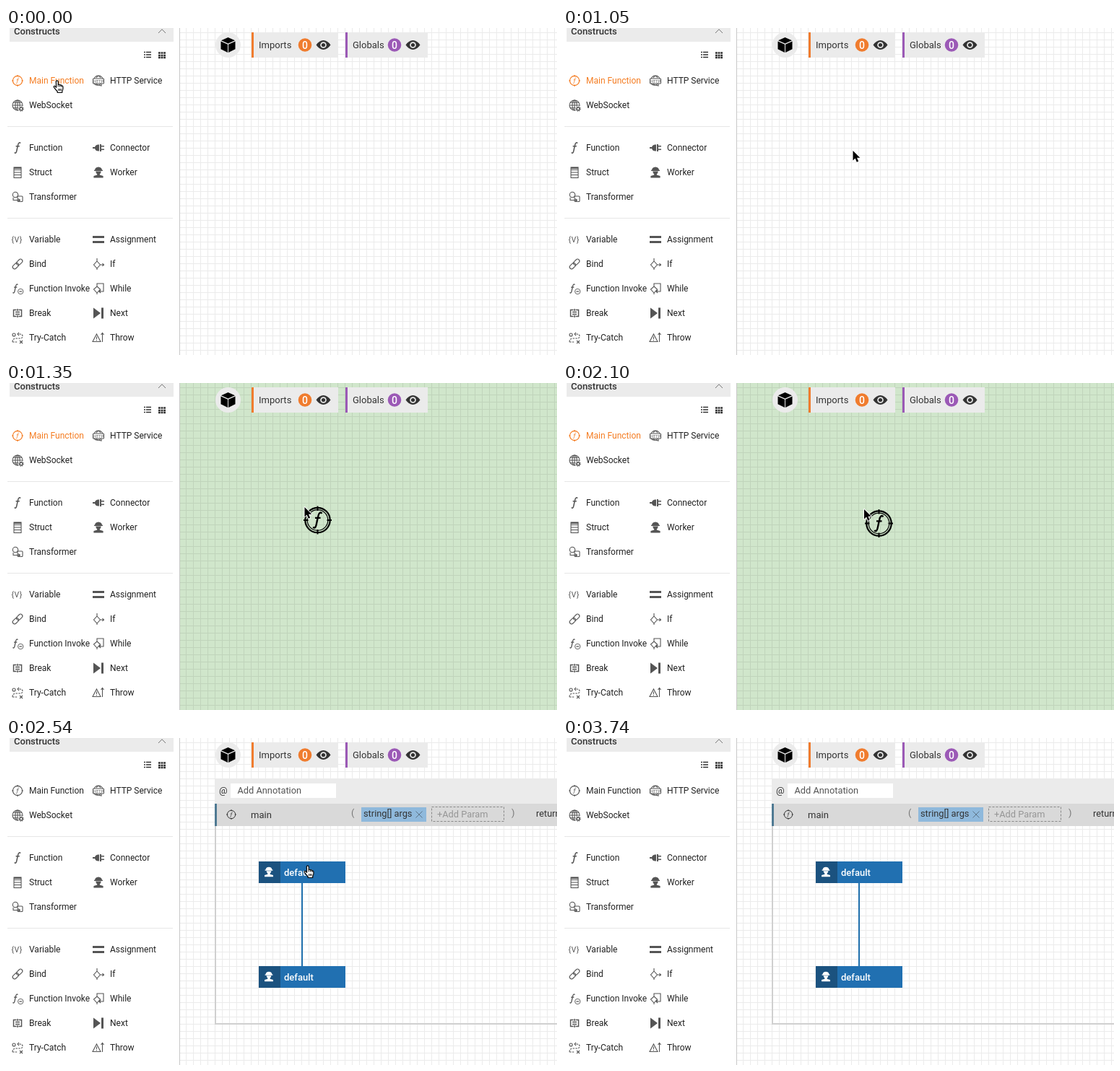
Write an HTML page that moves like this. It is 763 px wide and 453 px high and loops after 4.64 s.

```html
<!DOCTYPE html>
<html lang="en">
<head>
<meta charset="utf-8">
<title>Diagram editor</title>
<style>
  html, body { margin: 0; width: 100%; height: 100%; overflow: hidden; background: #fff; }
  svg { display: block; }
  text { font: 13px Roboto, sans-serif; fill: #333; white-space: pre; }
  .label text { font-size: 12px; fill: #222; }
  .icon { fill: none; stroke: #555; stroke-width: 1.1; color: #555; }
  .icon .solid { fill: currentColor; stroke: none; }
  .icon text { font-size: 6px; fill: currentColor; stroke: none; }
  .hot .icon { stroke: #f47b20; color: #f47b20; }
  .hot > text { fill: #f47b20; }
  .param text { font-size: 12.8px; }
</style>
</head>
<body>
<svg id="stage" width="763" height="453" viewBox="0 0 763 453">
  <defs>
    <pattern id="grid" x="249" y="6" width="10" height="10" patternUnits="userSpaceOnUse">
      <path d="M0 0H10V1H1V10H0Z" fill="#000" fill-opacity=".08"/>
    </pattern>
    <path id="f" d="M3.4-5.3C2.4-6.8 .9-5.8 .4-3L-1.1 3.9C-1.6 6.2-2.7 6.6-3.5 5.3M-2-1.8H2.3"/>
    <g id="target">
      <circle r="6.6"/>
      <path d="M0-8V-5.6M0 8V5.6M-8 0H-5.6M8 0H5.6"/>
      <use href="#f" transform="scale(.66)"/>
    </g>
    <g id="eye">
      <path d="M-10 0Q-5.5-6.5 0-6.5T10 0Q5.5 6.5 0 6.5T-10 0Z" fill="#333"/>
      <circle r="4.3" fill="#ebebeb"/><circle r="2.6" fill="#333"/>
    </g>
    <path id="person" d="M-5-3.2Q-4.6-7.2 0-7.5Q4.6-7.2 5-3.2H6V-2H-6V-3.2ZM-3.8-1.4H3.8Q3.4 1.4 1.8 2.5V3.6L6.6 5V7.5H-6.6V5L-1.8 3.6V2.5Q-3.4 1.4-3.8-1.4Z"/>
    <g id="arrow">
      <path d="M1.5 1V14.4L4.6 11.6 6.8 16.8 9.2 15.8 7 10.8H11.3Z" stroke="#fff" stroke-width="1.8" stroke-linejoin="round"/>
      <path d="M1.5 1V14.4L4.6 11.6 6.8 16.8 9.2 15.8 7 10.8H11.3Z"/>
    </g>
    <g id="hand">
      <path d="M4.3 2.3Q4.4.8 5.7.8T7.2 2.3V6.5Q8.8 5.6 9.6 7Q11.4 6.4 11.9 7.9Q13.8 7.6 13.9 9.5V12Q13.6 14.4 12.7 15.5V17.5H6.2V16Q4 13.6 1.2 9.8Q.9 8 2.6 8.4L4.6 10.3Z" fill="#fff" stroke="#000" stroke-width="1.2" stroke-linejoin="round"/>
      <path d="M7.2 6.5V9.5M9.6 7V9.7M11.9 7.9V10M7.7 12V15M9.5 12V15M11.3 12V15" stroke="#000" stroke-width=".9"/>
    </g>
  </defs>

  <rect id="paper" x="241" width="522" height="453"/>
  <rect x="241" width="522" height="453" fill="url(#grid)"/>

  <g id="diagram">
    <path d="M290 122V396H763" fill="none" stroke="#d0d0d0" stroke-width="2"/>
    <rect x="289" y="56" width="474" height="35" fill="#ebebeb"/>
    <rect x="311" y="63" width="146" height="20" fill="#fff"/>
    <text x="295" y="77">@</text>
    <rect x="289" y="91" width="474" height="31" fill="#d9d9d9"/>
    <rect x="289" y="91" width="3" height="31" fill="#4f7a93"/>
    <g class="icon" transform="translate(312 106) scale(.86)" style="stroke:#333"><use href="#target"/></g>
    <text x="339" y="111">main</text>
    <g class="param">
      <text x="320.500" y="77" style="fill:#555">Add Annotation</text>
      <text x="478" y="108" style="fill:#777">(</text>
      <rect x="492" y="96" width="90" height="20" fill="#8fb9dc"/>
      <text x="495" y="109">string[] args</text>
      <path d="M567.500 101.500L576.500 110.500M576.500 101.500L567.500 110.500" stroke="#5d7488"/>
      <rect x="589.500" y="95.500" width="100" height="20" fill="none" stroke="#888" stroke-dasharray="3 2"/>
      <text x="597" y="110" style="fill:#969696">+Add Param</text>
      <text x="700" y="108" style="fill:#777">)</text>
      <text x="734" y="109">returns</text>
    </g>
    <path d="M410 201V316" stroke="#1f6fac" stroke-width="2"/>
    <g id="boxes"></g>
  </g>

  <circle cx="307.500" cy="23.500" r="17.500" fill="#ebebeb"/>
  <path d="M307.500 13L317 17.200 307.500 21.500 298 17.200ZM297.500 18.500L307 22.700V34L297.500 29.300ZM317.500 18.500L308 22.700V34L317.500 29.300Z"/>
  <g id="tabs"></g>

  <rect width="240" height="453" fill="#fff"/>
  <path d="M240.500 0V453" stroke="#c8c8c8"/>
  <rect x="5" width="227" height="19" fill="#ebebeb"/>
  <text x="11" y="9" font-weight="500" style="font-weight:500">Constructs</text>
  <path d="M211 7L216 1.800 221 7" fill="none" stroke="#777"/>
  <path d="M191 33.500h2m1 0h7M191 37h2m1 0h7M191 40.500h2m1 0h7" stroke="#333" stroke-width="1.500"/>
  <path d="M211 34.500h10M211 38h10M211 41h10" stroke="#333" stroke-width="2.400" stroke-dasharray="2.800 .8"/>
  <path d="M2 136.500H231M2 263.500H231" stroke="#e6e6e6"/>
  <g id="palette"></g>

  <g id="drag" class="icon" style="stroke:#000">
    <circle r="17.200" stroke-width="2.200"/><circle r="14.300" stroke-width="1.200"/>
    <path d="M0-19.500V-13M0 19.500V13M-19.500 0H-13M19.500 0H13" stroke-width="1.800"/>
    <use href="#f" transform="scale(1.750)" stroke-width="1.350"/>
  </g>
  <g id="cursor"><use/></g>
</svg>
<script>
const $ = id => document.getElementById(id);
const line = d => `<path d="${d}"/>`;
const solid = d => `<path class="solid" d="${d}"/>`;
const globe = '<circle r="7"/><ellipse rx="3.2" ry="7"/>' + line('M0-7V7M-7 0H7M-6-3.700H6M-6 3.700H6');

// Palette entries: column, centre line, label, icon drawn around 0,0
const items = [
  [0, 73, 'Main Function', '<use href="#target"/>'],
  [1, 73, 'HTTP Service', line('M-6-3Q-4-7 0-7T6-3M-6 4Q-3 7 0 6L4 7V4M-3-4Q0-9 3-4M-3 4Q0 8 3 4') +
    '<rect x="-7.500" y="-3" width="15" height="7" rx="1"/><text x="-6.800" y="2.700" style="font-size:5.500px">HTTP</text>'],
  [0, 107, 'WebSocket', globe + '<circle cx="5" cy="5" r="4.300" fill="#fff" stroke="none"/><circle cx="5" cy="5" r="2" stroke-width="1.500"/>' +
    '<circle cx="5" cy="5" r="3.200" stroke-dasharray="1.200 1.300"/>'],
  [0, 166, 'Function', '<use href="#f" transform="scale(1.200)" stroke-width="1.300"/>'],
  [1, 166, 'Connector', solid('M-8-1H-5Q-4-4.500 0-4.500H1V4.500H0Q-4 4.500-5 1H-8ZM2-5H4V-3H8V-1.500H4V1.500H8V3H4V5H2Z')],
  [0, 200, 'Struct', '<rect x="-5" y="-7" width="10" height="14.500"/>' + line('M-5-3.500H5M-5 0H5M-5 3.500H5') + solid('M-5-7H5V-5H-5Z')],
  [1, 200, 'Worker', '<use class="solid" href="#person"/>'],
  [0, 234, 'Transformer', '<circle cx="-3" cy="-3" r="3.700"/><rect x="0" y="-1" width="7" height="7.500" rx="1"/>' +
    line('M-6 1V4.500H3M1 2.500L3.500 4.500 1 6.500')],
  [0, 293, 'Variable', '<text x="-8.500" y="3.500" style="font-size:10.500px;letter-spacing:.5px">{V}</text>'],
  [1, 293, 'Assignment', solid('M-8-5H8V-2H-8ZM-8 2H8V5H-8Z')],
  [0, 327, 'Bind', '<g transform="rotate(-45)"><rect x="-8.500" y="-2.700" width="9.500" height="5.400" rx="2.700"/><rect x="-1" y="-2.700" width="9.500" height="5.400" rx="2.700"/></g>'],
  [1, 327, 'If', line('M-2-4L2.500 1-2 6-6.500 1ZM-2-8V-4M-2 6V8M2.500 1H7M5.500-.8L7.500 1 5.500 2.800')],
  [0, 361, 'Function Invoke', '<use href="#f" x="-3" stroke-width="1.300"/><circle cx="4.200" cy="4" r="3.700" stroke-width=".9"/>' +
    '<path d="M2.500 4.800L4 3M4.400 5L6 3.200M2.500 4H6" stroke-width=".8"/>'],
  [1, 361, 'While', line('M-2-3L2.500 1-2 6-6.500 1ZM-2-3V-7H7V4H1M-2 6V8M3 2L1 4 3 6')],
  [0, 395, 'Break', '<g stroke-width="1.500">' + line('M-1.500-4.500H-5.500V4.500H-1.500M1.500-4.500H5.500V4.500H1.500M-3 1.500H3M-3-1.500H3M0-6V-3M0 3V6') + '</g>'],
  [1, 395, 'Next', solid('M-7-7.500L3 0-7 7.500ZM4-7.500H7V7.500H4Z')],
  [0, 429, 'Try-Catch', '<g stroke-dasharray="2.500 1.200">' + line('M-7 6Q-7 1-2 1H3Q7 1 7-2T3-5H0M-7 6H0') + '</g>' +
    line('M2-7L0-5 2-3M3 4L7 8M7 4L3 8') + '<circle cx="-5" cy="-4" r="2"/>'],
  [1, 429, 'Throw', line('M-2.500-5L3 5.500H-8ZM-2.500-1.500V2M-2.500 3V4.200M5.500 6V-6M3.500-4L5.500-6.500 7.500-4')]
];

$('palette').innerHTML = items.map(([col, y, name, icon]) => {
  const x = 16 + col * 112;
  return `<g class="label"><g class="icon" transform="translate(${x} ${y})">${icon}</g>` +
    `<text x="${x + 16}" y="${y + 4}">${name}</text></g>`;
}).join('');

$('tabs').innerHTML = [
  ['Imports', 340, 120, 74, '#f07c2e'],
  ['Globals', 470, 114, 68, '#9b59b6']
].map(([name, x, w, badge, tint]) => `
  <g transform="translate(${x} 6)">
    <rect width="${w}" height="35" fill="#ebebeb"/><rect width="3" height="35" fill="${tint}"/>
    <text x="10" y="22">${name}</text>
    <circle cx="${badge}" cy="17.500" r="9.300" fill="${tint}"/>
    <text x="${badge}" y="22.500" text-anchor="middle" style="fill:#fff;font-size:14px;font-weight:500">0</text>
    <use href="#eye" x="${badge + 25.5}" y="17.500"/>
  </g>`).join('');

$('boxes').innerHTML = [171, 316].map(y => `
  <g transform="translate(350 ${y})">
    <rect width="120" height="30" fill="#2170b1"/><rect width="30" height="30" fill="#1b527f"/>
    <use href="#person" transform="translate(14 14.500) scale(.9)" fill="#fff"/>
    <text x="35" y="20" style="fill:#fff;font-weight:500">default</text>
  </g>`).join('');

const LOOP = 4640;
const moves = [
  [0, 65, 72], [300, 120, 93], [450, 284, 129], [600, 310, 132], [900, 388, 165],
  [1050, 400, 169], [1200, 401, 169], [1350, 412, 171], [1500, 415, 172], [1650, 417, 174],
  [1950], [2100, 415.5, 174], [2540, 412, 176], [3290, 501, 370], [3440, 522, 395],
  [3590, 525, 398], [3740]
];
const drags = [
  [0], [1200, 90.5, 90, .5], [1350, 431.5, 190, 1], [1500, 436.5, 192.5, 1],
  [1650, 440.5, 194.5, 1], [2100, 437.5, 194.5, 1], [2250]
];
const papers = [[0, '#fff'], [1200, '#fffacf'], [1350, '#d0e6cb'], [2250, '#fff']];

const at = (steps, t) => steps.filter(s => s[0] <= t).pop();

function place(node, [, x, y]) {
  node.style.display = x === undefined ? 'none' : '';
  if (x !== undefined) node.setAttribute('transform', `translate(${x} ${y})`);
}

function draw(t) {
  const move = at(moves, t), drag = at(drags, t);
  const done = t >= 2540;
  place($('cursor'), move);
  const hand = move[0] === 0 || move[0] === 2540;
  $('cursor').firstChild.setAttribute('href', hand ? '#hand' : '#arrow');
  place($('drag'), drag);
  $('drag').setAttribute('opacity', drag[3] || 0);
  $('paper').setAttribute('fill', at(papers, t)[1]);
  $('diagram').style.display = done ? '' : 'none';
  $('palette').firstChild.classList.toggle('hot', !done);
}

const start = performance.now();
function tick() {
  draw((performance.now() - start) % LOOP);
  requestAnimationFrame(tick);
}
draw(0);
requestAnimationFrame(tick);
</script>
</body>
</html>
```
